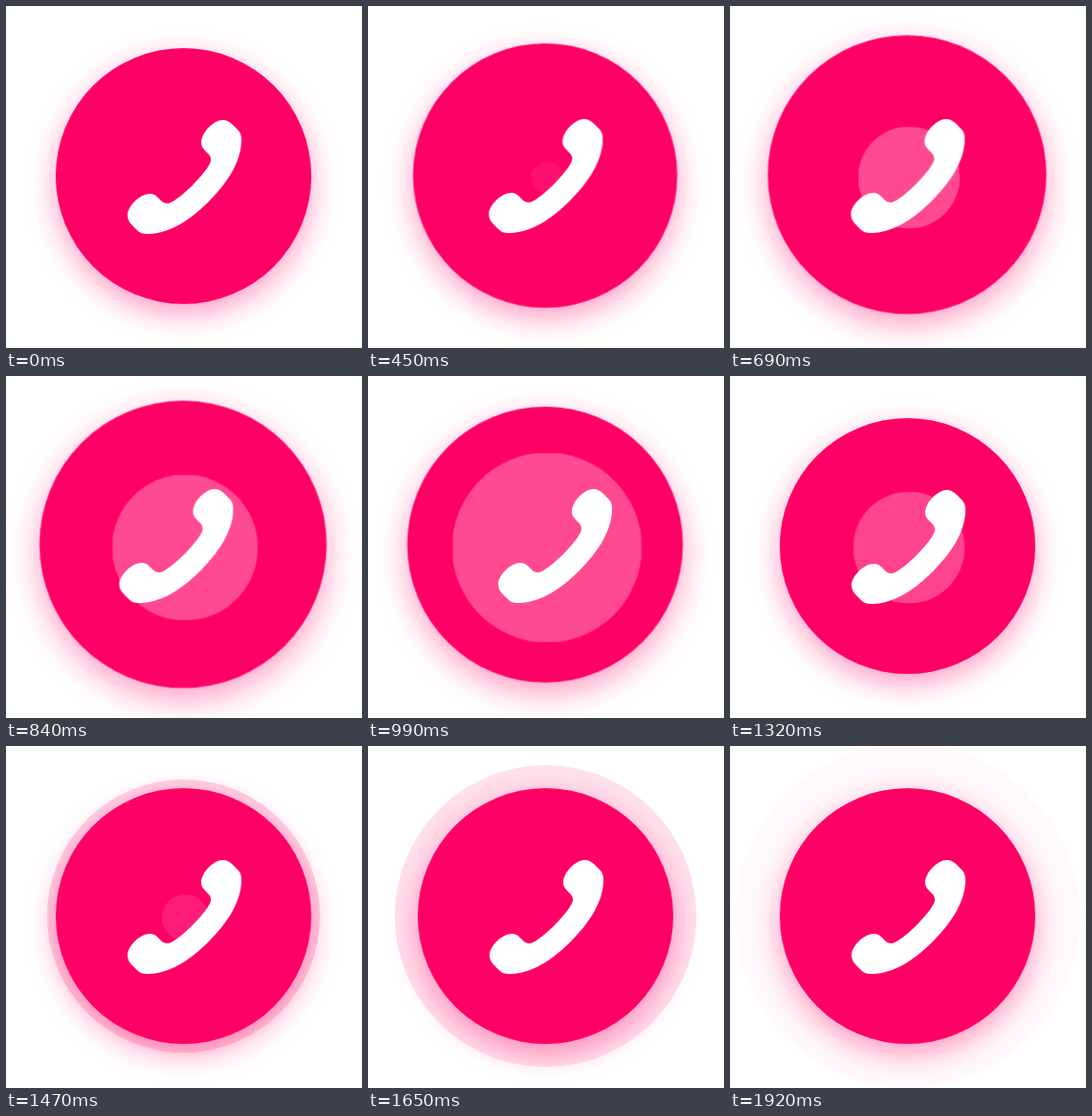
An HTML page for the animation above (2.4 s loop, 372 px wide and 357 px high).

```html
<!DOCTYPE html>
<html lang="en">
<head>
<meta charset="utf-8">
<title>Call button</title>
<style>
  html, body { margin: 0; width: 100%; height: 100%; overflow: hidden; background: #fff; }
  .stage { position: relative; width: 372px; height: 357px; overflow: hidden; }
  .stage > * { position: absolute; animation: 2400ms linear infinite; }
  .disc { left: 52px; top: 44px; width: 267px; height: 267px; border-radius: 50%; background: #f06; }

  .stage > .halo { opacity: .22; animation-name: halo; }
  .stage > .button { box-shadow: 0 10px 30px rgba(255, 0, 102, .4); animation-name: swell; }
  .stage > .ripple {
    left: 73.5px; top: 65.5px; width: 226px; height: 226px;
    border-radius: 50%; background: #fff; clip-path: inset(.5%);
    animation-name: ripple, glow;
  }
  .stage > .phone { left: 0; top: 0; fill: #fff; animation-name: shake; animation-timing-function: ease-in-out; }

  @keyframes swell {
    0%, 10% { transform: none; }
    18.75% { transform: translate(-.4px, -.5px) scale(1.034); }
    28.75% { transform: translate(-.5px, -1.5px) scale(1.09); }
    35% { transform: translate(-.5px, -1.7px) scale(1.124); }
    41.25% { transform: translate(-.5px, -1.5px) scale(1.079); }
    52.1%, 100% { transform: none; }
  }
  @keyframes shake {
    0%, 8.75%, 53.75%, 100% { transform: none; }
    11.25%, 21.25%, 31.25%, 41.25%, 51.25% { transform: translate(9px, -1px); }
    16.25%, 26.25%, 36.25%, 46.25% { transform: translate(-11px, -1px); }
  }
  @keyframes ripple {
    0%, 14.33%, 65.7%, 100% { transform: scale(0); }
    45.04% { transform: scale(1); }
  }
  @keyframes glow {
    0%, 16.7% { opacity: 0; }
    27%, 50% { opacity: .29; }
    55% { opacity: .27; }
    65.7%, 100% { opacity: 0; }
  }
  @keyframes halo {
    0%, 56.75% { transform: none; opacity: .22; }
    80%, 100% { transform: scale(1.348); opacity: .025; }
  }
</style>
</head>
<body>
<div class="stage">
  <div class="disc halo"></div>
  <div class="disc button"></div>
  <div class="ripple"></div>
  <svg class="phone" width="372" height="357" viewBox="0 0 372 357">
    <path d="M226 119C231 119 234 121 237 124L242 129C245 132 246 135 246 140
      C246 164 229 187 212 204C195 221 172 238 148 238
      C143 238 140 237 137 234L132 229C129 226 127 223 127 218
      C127 210 139 196 151 196C159 196 161 206 168 206
      C173 207 187 195 195 187C203 179 215 165 214 160
      C214 153 204 151 204 143C204 131 218 119 226 119Z"/>
  </svg>
</div>
</body>
</html>
```
